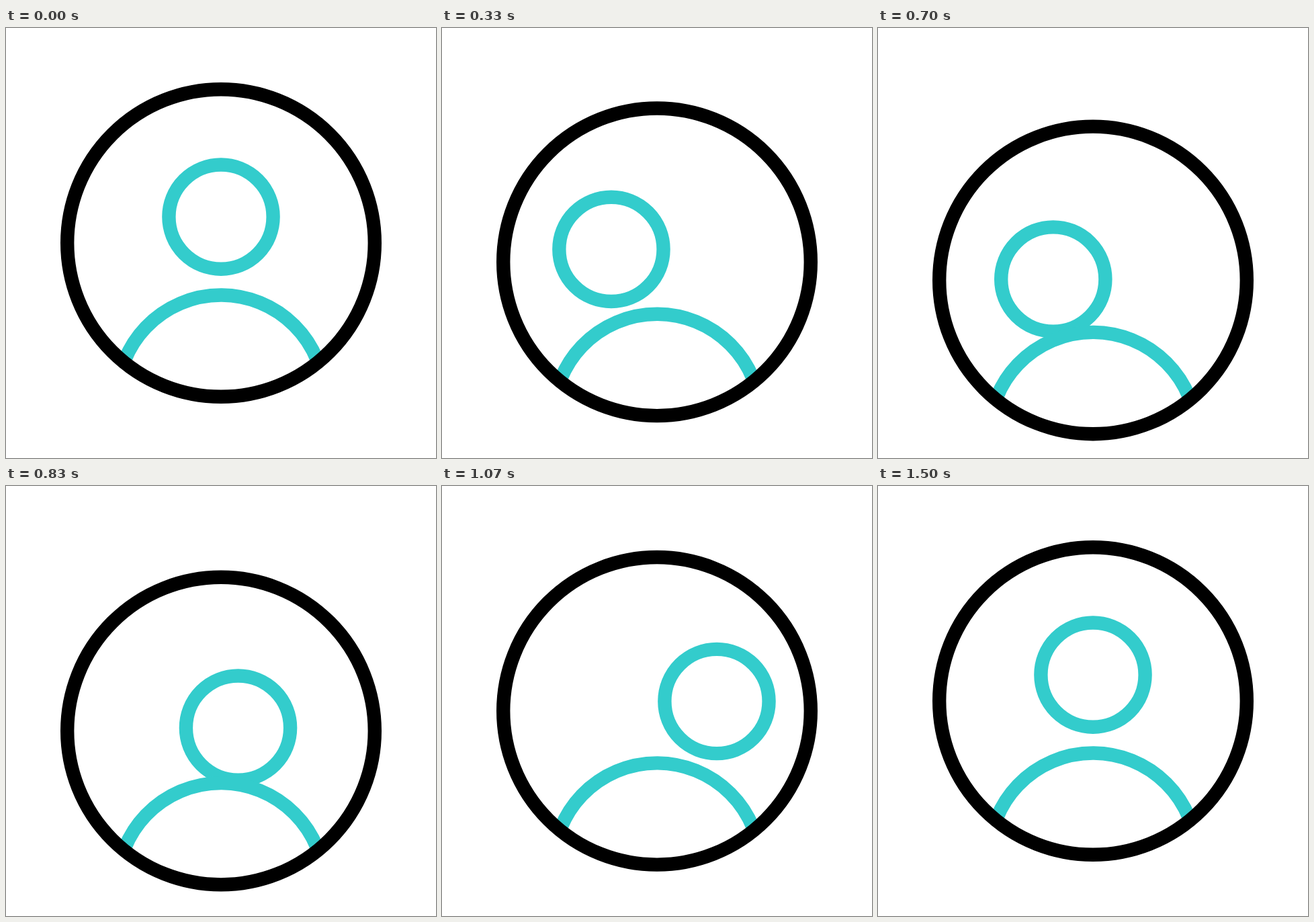
An HTML page with a canvas for the animation above (2000 ms loop, 640x640 px).

```html
<!DOCTYPE html>
<html lang="en">
<head>
<meta charset="utf-8">
<title>Rolling profile icon</title>
<style>
  html, body { margin: 0; width: 100%; height: 100%; overflow: hidden; background: #fff; }
  canvas { display: block; width: 100vw; height: 100vh; }
</style>
</head>
<body>
<canvas id="stage" width="640" height="640"></canvas>
<script>
const ctx = document.getElementById('stage').getContext('2d');
const LOOP = 2000, STEP = 1000 / 30, REST = 1500;
const BLACK = '#000', TEAL = '#33cccc';

// Head positions relative to the ring: rest, far left, far right.
const HOME = [0, 0], LEFT = [-102.5, 36], RIGHT = [88, 28];

const add = (a, b, k = 1) => [a[0] + b[0] * k, a[1] + b[1] * k];

function ease(t, from, to) {
  const u = Math.min(1, Math.max(0, (t - from) / (to - from)));
  return u * u * (3 - 2 * u);
}

// Cubic curve sampled by arc length.
function makePath(a, b, c, d) {
  const N = 200, points = [a], lengths = [0];
  for (let i = 1; i <= N; i++) {
    const t = i / N, s = 1 - t;
    const p = [0, 1].map(k =>
      s * s * s * a[k] + 3 * s * s * t * b[k] + 3 * s * t * t * c[k] + t * t * t * d[k]);
    const q = points[i - 1];
    points.push(p);
    lengths.push(lengths[i - 1] + Math.hypot(p[0] - q[0], p[1] - q[1]));
  }
  return progress => {
    const goal = progress * lengths[N];
    let i = 1;
    while (i < N && lengths[i] < goal) i++;
    const k = (goal - lengths[i - 1]) / (lengths[i] - lengths[i - 1]);
    return add(points[i - 1], add(points[i], points[i - 1], -1), k);
  };
}

// Smooth tangents: each is a sixth of the step between the neighbouring positions.
const goLeft = makePath(HOME, add(HOME, LEFT, 1 / 6), add(LEFT, RIGHT, -1 / 6), LEFT);
const goRight = makePath(LEFT, add(LEFT, RIGHT, 1 / 6), add(RIGHT, LEFT, 1 / 6), RIGHT);
const goHome = makePath(RIGHT, add(RIGHT, LEFT, -1 / 6), add(HOME, RIGHT, 1 / 6), HOME);

function headOffset(t) {
  if (t < 566) return goLeft(ease(t, 0, 566));
  if (t < 1000) return goRight(ease(t, 566, 1000));
  return goHome(ease(t, 1000, 1483));
}

const drop = t => 56.6 * (t < 645 ? ease(t, 0, 667) : 1 - ease(t, 645, 1280));

function arc(x, y, r, color, from = 0, to = 2 * Math.PI) {
  ctx.strokeStyle = color;
  ctx.beginPath();
  ctx.arc(x, y, r, from, to);
  ctx.stroke();
}

function draw(time) {
  const frame = Math.floor((time % LOOP + 3.4) / STEP);
  const t = Math.min(frame * STEP, REST);
  const [x, y] = headOffset(t);
  const top = -Math.PI / 2, spread = 68 * Math.PI / 180;

  ctx.fillStyle = '#fff';
  ctx.fillRect(0, 0, 640, 640);
  ctx.lineWidth = 20.4;
  ctx.save();
  ctx.translate(320, drop(t));
  arc(x, 281.1 + y, 77.6, TEAL);
  arc(0, 551.9, 154.4, TEAL, top - spread, top + spread);
  arc(0, 320, 228.8, BLACK);
  ctx.restore();
}

const start = performance.now();
function tick() {
  draw(performance.now() - start);
  requestAnimationFrame(tick);
}
tick();
</script>
</body>
</html>
```
